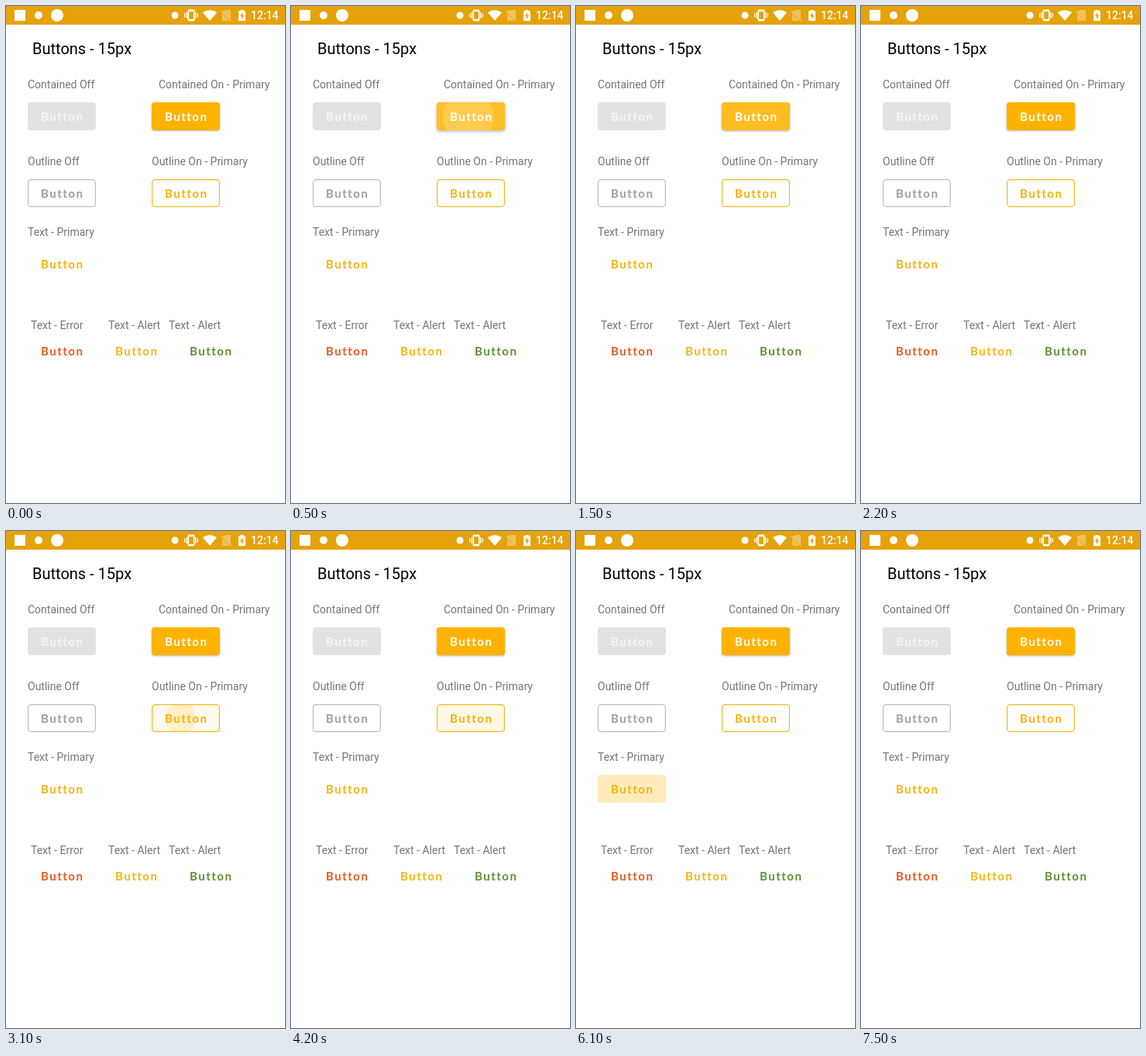
Recreate the animation shown at these times as an HTML page with a canvas. Size 360 by 640 pixels, loop 8000 ms.

```html
<!DOCTYPE html>
<html lang="en">
<head>
<meta charset="utf-8">
<title>Buttons</title>
<style>
  html, body { margin: 0; width: 100%; height: 100%; overflow: hidden; background: #fff; }
  canvas, svg { position: absolute; left: 0; top: 0; width: 360px; height: 640px; }
  text { font: 14px Roboto, sans-serif; fill: #757575; }
  .title { font-size: 20px; fill: #000; }
  .clock { font-weight: 500; fill: #fff; }
  .btn { font: 700 15px Lato, sans-serif; letter-spacing: 1.5px; }
</style>
</head>
<body>
<canvas id="stage"></canvas>
<svg viewBox="0 0 360 640">
  <text class="clock" x="316" y="17">12:14</text>
  <text class="title" x="34" y="62">Buttons - 15px</text>
  <text x="28" y="106">Contained Off</text>
  <text x="197" y="106">Contained On - Primary</text>
  <text x="28" y="205">Outline Off</text>
  <text x="188" y="205">Outline On - Primary</text>
  <text x="28" y="296">Text - Primary</text>
  <text x="32" y="416">Text - Error</text>
  <text x="132" y="416">Text - Alert</text>
  <text x="210" y="416">Text - Alert</text>
  <text class="btn" x="45" y="148" style="fill:#f6f6f6">Button</text>
  <text class="btn" x="205" y="148" style="fill:#fff">Button</text>
  <text class="btn" x="45" y="247" style="fill:#9e9e9e">Button</text>
  <text class="btn" x="205" y="247" style="fill:#f8b20a">Button</text>
  <text class="btn" x="45" y="338" style="fill:#f8b20a">Button</text>
  <text class="btn" x="45" y="450" style="fill:#e65a20">Button</text>
  <text class="btn" x="141" y="450" style="fill:#f5b510">Button</text>
  <text class="btn" x="237" y="450" style="fill:#5c9032">Button</text>
</svg>
<script>
const LOOP = 8000, W = 88, H = 36, AMBER = '#ffb300';
const canvas = document.getElementById('stage');
const ctx = canvas.getContext('2d');
const dpr = window.devicePixelRatio || 1;
canvas.width = 360 * dpr;
canvas.height = 640 * dpr;

// x, y: button corner; cx, cy: touch point; start/grow/fade/end in ms
const ripples = {
  contained: { x: 188, y: 124, cx: 222, cy: 142, start: 60, grow: 1000, fade: 1000, end: 1800,
               rgb: '255,255,255', back: .18, wave: .18, inset: 0 },
  outline:   { x: 188, y: 223, cx: 220, cy: 241, start: 2860, grow: 1000, fade: 3600, end: 4500,
               rgb: '255,179,0', back: .13, wave: .16, inset: 1 },
  text:      { x: 28, y: 314, cx: 71, cy: 332, start: 5560, grow: 480, fade: 6120, end: 6420,
               rgb: '255,179,0', back: .13, wave: .16, inset: 0 }
};

const clamp = v => Math.max(0, Math.min(1, v));
const easeOut = p => 1 - (1 - p) ** 2;

function box(x, y, w, h, r) {
  ctx.beginPath();
  ctx.roundRect(x, y, w, h, r);
}

function poly(...pts) {
  ctx.beginPath();
  pts.forEach(([x, y]) => ctx.lineTo(x, y));
  ctx.closePath();
  ctx.fill();
}

function disc(x, y, r) {
  ctx.beginPath();
  ctx.arc(x, y, r, 0, Math.PI * 2);
  ctx.fill();
}

function outline(x, y, color) {
  box(x + .6, y + .6, W - 1.2, H - 1.2, 4);
  ctx.strokeStyle = color;
  ctx.lineWidth = 1.2;
  ctx.stroke();
}

function ripple(o, t) {
  if (t < o.start || t >= o.end) return;
  const age = t - o.start;
  const p = easeOut(clamp(age / o.grow));
  const left = 1 - clamp((t - o.fade) / (o.end - o.fade));
  const midX = o.x + W / 2, midY = o.y + H / 2;
  ctx.save();
  box(o.x + o.inset, o.y + o.inset, W - 2 * o.inset, H - 2 * o.inset, 4 - o.inset);
  ctx.clip();
  ctx.fillStyle = `rgba(${o.rgb},${o.back * clamp(age / 500) * left})`;
  ctx.fillRect(o.x, o.y, W, H);
  ctx.fillStyle = `rgba(${o.rgb},${o.wave * left})`;
  disc(o.cx + (midX - o.cx) * p, o.cy + (midY - o.cy) * p, Math.hypot(W, H) / 2 * p + (p === 1 ? 1 : 0));
  ctx.restore();
}

function statusBar() {
  ctx.fillStyle = '#e5a209';
  ctx.fillRect(0, 0, 360, 24);
  ctx.fillStyle = ctx.strokeStyle = '#fff';

  // app marks
  ctx.fillRect(11, 5, 14, 14);
  disc(42, 12, 5);
  disc(66, 12, 8);
  disc(218, 12, 4.5);

  // vibrating phone
  ctx.lineWidth = 1.6;
  box(235.3, 5.3, 7.4, 13.4, 1.2);
  ctx.stroke();
  ctx.fillRect(235, 5, 8, 2.2);
  ctx.fillRect(235, 16.8, 8, 2.2);
  for (const [dx, h] of [[5.7, 8], [8.3, 5]]) {
    ctx.fillRect(239 - dx - .7, 12 - h / 2, 1.4, h);
    ctx.fillRect(239 + dx - .7, 12 - h / 2, 1.4, h);
  }

  // wifi
  ctx.beginPath();
  ctx.moveTo(263, 19);
  ctx.lineTo(253.8, 8.3);
  ctx.quadraticCurveTo(263, 2.2, 272.2, 8.3);
  ctx.fill();

  // missing SIM
  ctx.save();
  ctx.globalAlpha = .35;
  poly([283, 5], [290, 5], [290, 18], [279, 7.5]);
  poly([279, 9.5], [288, 19], [279, 19]);
  ctx.lineWidth = 1.3;
  ctx.beginPath();
  ctx.moveTo(277.5, 6);
  ctx.lineTo(290.5, 19.5);
  ctx.stroke();
  ctx.restore();

  // charging battery
  ctx.fillRect(302.5, 5, 4, 2);
  box(300, 6.3, 9, 12.9, 1);
  ctx.fill();
  ctx.fillStyle = '#e5a209';
  poly([305.2, 8], [302, 13.3], [304, 13.3], [304, 17.2], [307.2, 11.8], [305.2, 11.8]);
}

function draw(t) {
  ctx.setTransform(dpr, 0, 0, dpr, 0, 0);
  ctx.fillStyle = '#fff';
  ctx.fillRect(0, 0, 360, 640);
  statusBar();

  ctx.fillStyle = '#e2e2e2';
  box(28, 124, W, H, 4);
  ctx.fill();

  const c = ripples.contained;
  const lift = clamp((t - c.start) / 200) * (1 - clamp((t - c.fade) / 800));
  ctx.save();
  ctx.shadowColor = 'rgba(0,0,0,.3)';
  ctx.shadowBlur = (2.5 + 1.5 * lift) * dpr;
  ctx.shadowOffsetY = (1 + .5 * lift) * dpr;
  ctx.fillStyle = AMBER;
  box(188, 124, W, H, 4);
  ctx.fill();
  ctx.restore();

  Object.values(ripples).forEach(o => ripple(o, t));
  outline(28, 223, '#bdbdbd');
  outline(188, 223, '#f5bb1c');
}

const begin = performance.now();
function tick() {
  draw((performance.now() - begin) % LOOP);
  requestAnimationFrame(tick);
}
tick();
</script>
</body>
</html>
```
